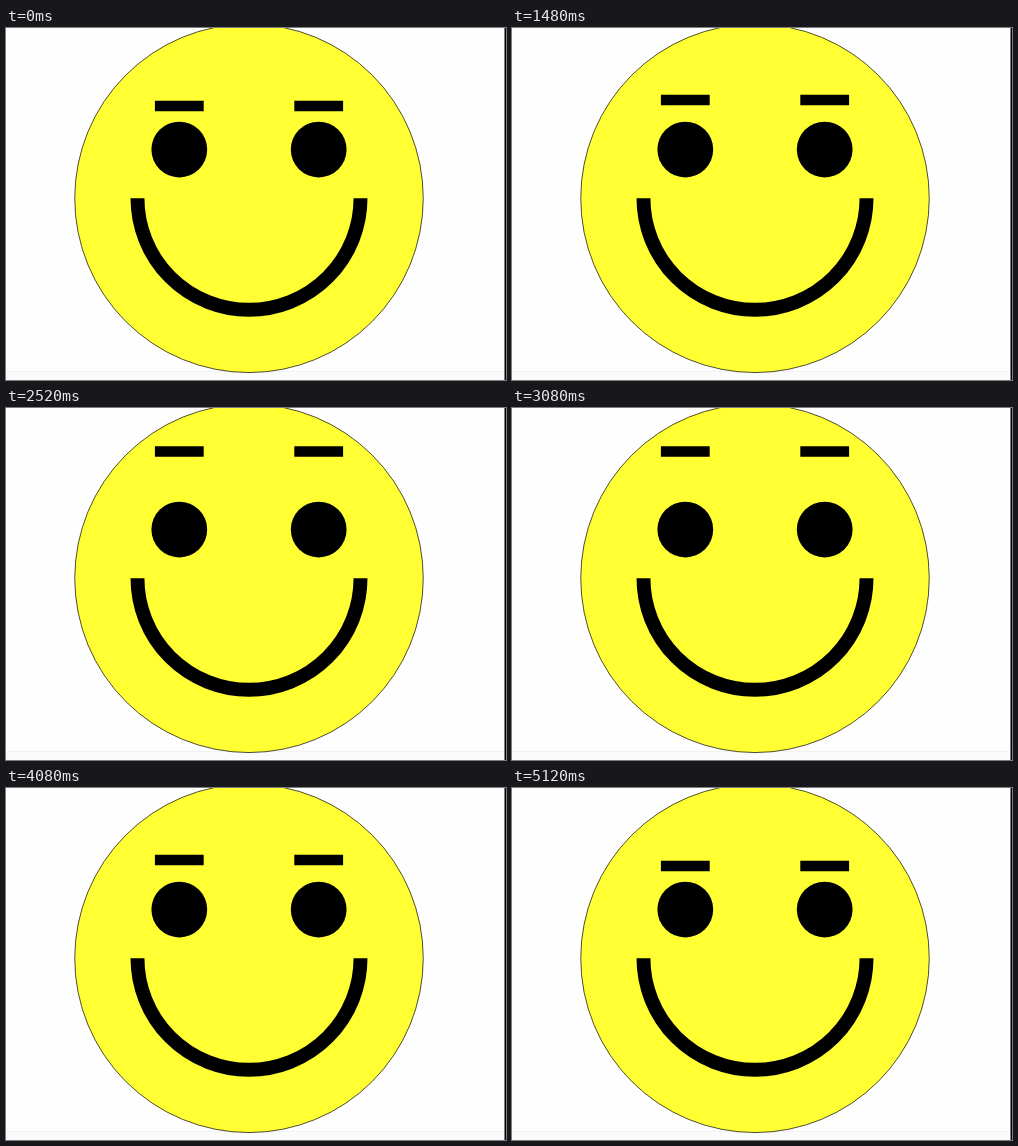
An HTML page for the animation above (5280 ms loop, 500 by 352 pixels).

```html
<!DOCTYPE html>
<html lang="en">
<head>
<meta charset="utf-8">
<title>Smiley raising its eyebrows</title>
<style>
  html, body { margin: 0; width: 100%; height: 100%; overflow: hidden; background: #fefefe; }
  svg { display: block; }
</style>
</head>
<body>
<svg width="500" height="352" viewBox="0 0 500 352">
  <rect y="343" width="498" height="9" fill="#fbfbfb"/>
  <rect y="343" width="498" height="1" fill="#f2f2f2"/>
  <rect x="498.5" width="1.5" height="352"/>
  <g transform="translate(243 170.3) scale(.697)">
    <circle r="250" fill="#ffff33" stroke="#000"/>
    <circle cx="-100" cy="-70" r="40"/>
    <circle cx="100" cy="-70" r="40"/>
    <path d="M-160 0A160 160 0 0 0 160 0" fill="none" stroke="#000" stroke-width="20"/>
    <path id="brows" d="M-135-140h70v15h-70zM65-140h70v15h-70z"/>
  </g>
</svg>
<script>
  const LOOP = 5280, STEP = 40, MOVE = 2000, RISE_AT = 780, FALL_AT = RISE_AT + MOVE;
  const LIFT = 50;
  const brows = document.getElementById('brows');

  function cubicInOut(x) {
    const t = Math.min(1, Math.max(0, x));
    return t < 0.5 ? 4 * t ** 3 : 1 - 4 * (1 - t) ** 3;
  }

  function draw() {
    const time = Math.floor(performance.now() % LOOP / STEP) * STEP;
    const raised = cubicInOut((time - RISE_AT) / MOVE) - cubicInOut((time - FALL_AT) / MOVE);
    brows.setAttribute('transform', `translate(0 ${-LIFT * raised})`);
    requestAnimationFrame(draw);
  }
  draw();
</script>
</body>
</html>
```
